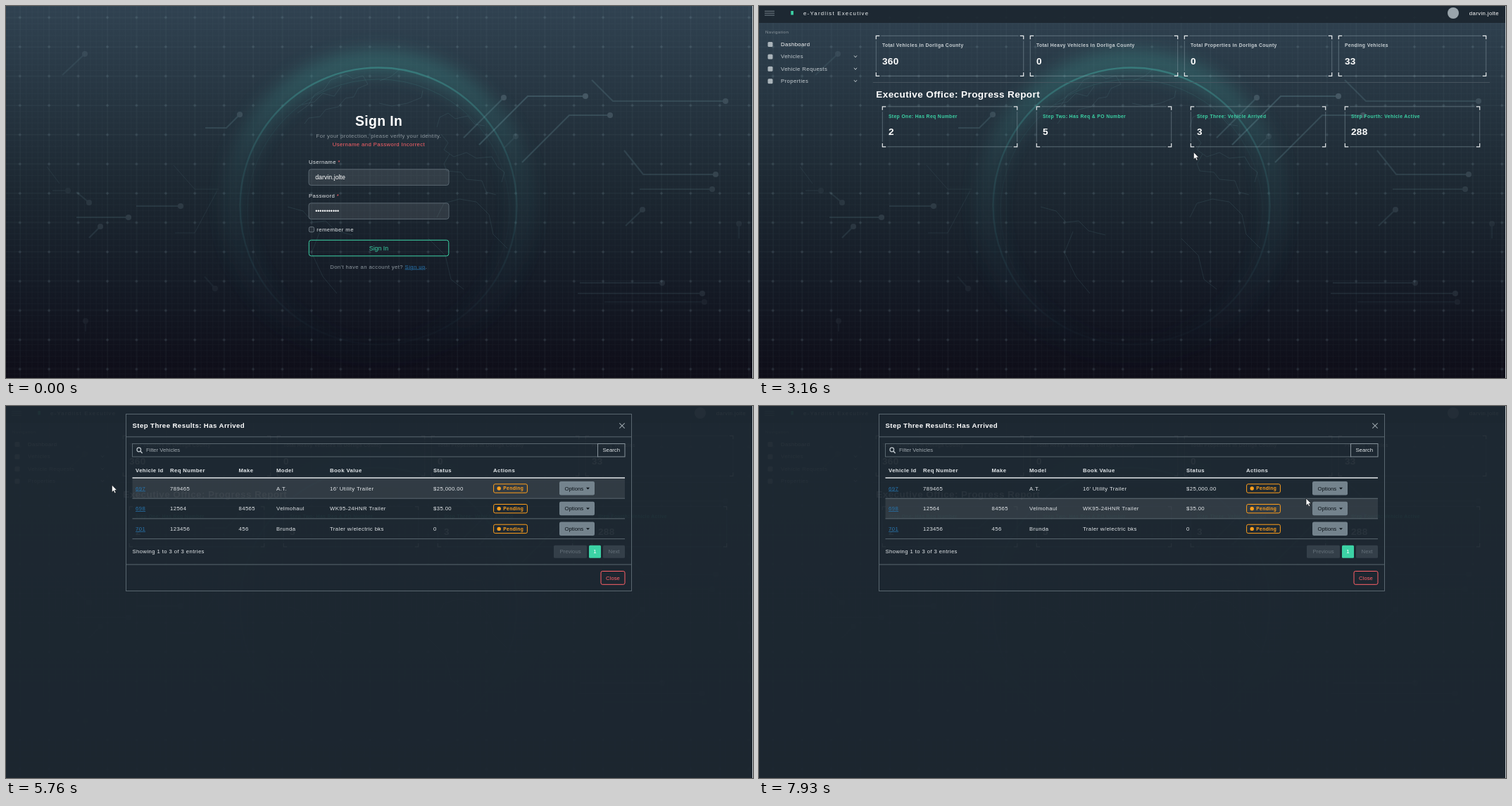
An HTML page for the animation above (8 s loop, 1061 by 528 pixels).

```html
<!DOCTYPE html>
<html lang="en">
<head>
<meta charset="utf-8">
<title>Vehicle progress dashboard</title>
<style>
  html, body { margin: 0; width: 100%; height: 100%; overflow: hidden; background: #141a24; }
  svg { display: block; width: 100vw; height: 100vh; }
  text { font-family: "Liberation Sans", Arial, sans-serif; white-space: pre; }
</style>
</head>
<body>
<svg id="stage" viewBox="0 0 1061 528" xmlns="http://www.w3.org/2000/svg"></svg>
<script>
const LOOP = 8000;
const GREEN = '#3cd2a5', RED = '#ff6168', ORANGE = '#ff9f1c', LINE = '#59666f', LINK = '#2674ad';
const USER = 'darvin.jolte', COUNTY = 'Dorliga County', BRAND = 'e-Yardlist Executive';
const BODY = 7.74, SMALL = 6.77, INPUT = 8.84;

const $ = id => document.getElementById(id);
const clamp = v => Math.max(0, Math.min(1, v));
const ease = v => 1 - (1 - clamp(v)) ** 2;

// drawing helpers
const text = (x, y, s, { size = BODY, fill = '#e3e7ea', bold, gap = .4, anchor = 'start', more = '' } = {}) =>
  `<text x="${x}" y="${y}" font-size="${size}" fill="${fill}" letter-spacing="${gap}" text-anchor="${anchor}"` +
  `${bold ? ' font-weight="700"' : ''} ${more}>${s}</text>`;
const rect = (x, y, w, h, fill = 'none', stroke = 'none', r = 0, more = '') =>
  `<rect x="${x}" y="${y}" width="${w}" height="${h}" rx="${r}" fill="${fill}" stroke="${stroke}" ${more}/>`;
const path = (d, stroke, width = 1, more = '') =>
  `<path d="${d}" fill="none" stroke="${stroke}" stroke-width="${width}" ${more}/>`;
const hline = (x1, x2, y, stroke = LINE, width = 1) => path(`M${x1} ${y}H${x2}`, stroke, width);

const defs = `<defs>
  <linearGradient id="sky" x2="0" y2="1">
    <stop offset="0" stop-color="#304251"/><stop offset=".25" stop-color="#263541"/>
    <stop offset=".5" stop-color="#1c2731"/><stop offset=".75" stop-color="#141a25"/>
    <stop offset="1" stop-color="#0e0d18"/>
  </linearGradient>
  <linearGradient id="rim" gradientUnits="userSpaceOnUse" x1="0" y1="85" x2="0" y2="480">
    <stop offset="0" stop-color="#3f9c96" stop-opacity=".55"/>
    <stop offset=".35" stop-color="#3a8084" stop-opacity=".24"/>
    <stop offset="1" stop-color="#3a7080" stop-opacity=".03"/>
  </linearGradient>
  <linearGradient id="wave">
    <stop offset="0" stop-color="#70787e" stop-opacity="0"/>
    <stop offset=".5" stop-color="#70787e"/>
    <stop offset="1" stop-color="#70787e" stop-opacity="0"/>
  </linearGradient>
  <filter id="soft" x="-30%" y="-30%" width="160%" height="160%"><feGaussianBlur stdDeviation="12"/></filter>
  <pattern id="fine" width="8.28" height="8.28" x="20" y="16.5" patternUnits="userSpaceOnUse">
    <path d="M0 0H8.28M0 0V8.28" stroke="#8fb0c0" stroke-width=".8" opacity=".07"/>
  </pattern>
  <pattern id="coarse" width="41.42" height="41.6" x="-1" y="-4.5" patternUnits="userSpaceOnUse">
    <path d="M0 20.8H41.4M20.7 0V41.6" stroke="#8fb0c0" stroke-width=".7" opacity=".07"/>
    <path d="M18.7 20.8h4M20.7 18.8v4" stroke="#a5c4d0" stroke-width=".8" opacity=".22"/>
  </pattern>
</defs>`;

function backdrop() {
  // each trace ends in a node: opacity, then the path from node to tail
  const traces = [
    [.24, 'M823 128H741L672 197'], [.2, 'M858 155H800L733 222'], [.2, 'M707 130L650 187'],
    [.17, 'M1022 135H862L832 105'], [.09, 'M724 185L708 201'], [.16, 'M1008 239H905L878 205'],
    [.12, 'M1003 260H900'], [.12, 'M904 289L880 312'], [.07, 'M1041 309V330'],
    [.1, 'M932 393H815'], [.1, 'M989 408H812'], [.06, 'M992 420H850'],
    [.1, 'M112 68L80 98'], [.17, 'M332 154L313 173H283'], [.13, 'M248 284H185'],
    [.14, 'M174 300H100'], [.12, 'M134 313L118 329'], [.06, 'M88 262H66'],
    [.1, 'M118 279L100 264'], [.06, 'M113 447V462'], [.06, 'M297 401L282 384']
  ].map(([o, d]) => {
    const [x, y] = d.match(/\d+/g);
    return `<g opacity="${o}">${path(d, '#7fb0b8', 2.2)}<circle cx="${x}" cy="${y}" r="4" fill="#a9c4cf"/></g>`;
  }).join('');
  const coast = 'M414 152l16-12 8-14 14-8 9-13 22-8 10 6 14-4 7 12-14 6-6 12-12 2-10 12-18 4-8 10-16 2-6 8M420 140l18-4 12-12 16 4 10-14' +
    'M531 106l16-6 12-10M530 138l18 4 22-4 20-8 2-10M612 172l4-14 12-6 10 8 18-4 10 12 14 2M618 182l10 12-6 10 14 10 18-6 14 8 22-2 8 14 10 8-4 14' +
    'M630 210l-8 14 4 10 20 2 8 10 22 2 6 16 14 4M612 300l10-20 22-6 24 4 18 18 6 28 20 20M400 285l22 6 14 16 18-2 14 14 24 6M446 320l-12 30 16 34 20 24M600 330l24 24 8 34 18 14';
  return rect(0, 0, 1061, 528, 'url(#sky)') + rect(0, 0, 1061, 528, 'url(#fine)') + rect(0, 0, 1061, 528, 'url(#coarse)') +
    `<circle cx="529" cy="284" r="205" fill="none" stroke="url(#rim)" stroke-width="34" filter="url(#soft)" opacity=".6"/>` +
    `<circle cx="529" cy="284" r="196.5" fill="none" stroke="url(#rim)" stroke-width="2.4"/>` +
    `<circle cx="529" cy="290" r="186" fill="none" stroke="url(#rim)" stroke-width="1" opacity=".35"/>` +
    path(coast, '#6fa3a8', 1, 'opacity=".15"') + path('M302 260H268L238 226M300 262L268 322H240M58 228l18 24', '#7fb0b8', 1, 'opacity=".1"') + traces;
}

function login() {
  const star = '<tspan fill="#ff6168"> *</tspan>';
  const field = y => rect(430, y, 199, 22.6, '#ffffff18', '#596670', 3.3);
  return text(529.6, 169.5, 'Sign In', { size: 19.34, bold: 1, fill: '#fff', anchor: 'middle' }) +
    text(529.4, 187.3, 'For your protection, please verify your identity.', { fill: '#8b959d', anchor: 'middle' }) +
    text(529.4, 199, 'Username and Password Incorrect', { fill: RED, anchor: 'middle' }) +
    text(430, 223.6, 'Username' + star) + field(231.8) +
    text(439.2, 246, USER, { size: INPUT, gap: 0, fill: '#fff' }) +
    text(430, 271.6, 'Password' + star) + field(279.8) +
    text(439.2, 294, '•'.repeat(11), { size: INPUT, gap: 0, fill: '#fff' }) +
    rect(430.4, 313.6, 7.2, 7.2, '#ffffff10', '#69757e', 2) + text(441.3, 319.8, 'remember me') +
    rect(428.5, 330.5, 202, 26, 'none', '#3cd2a580', 4.5, 'id="ring" stroke-width="3"') +
    rect(430.3, 332.3, 198.5, 22.5, 'none', GREEN, 3.3, 'id="signBtn"') +
    text(529.5, 346.5, 'Sign In', { size: INPUT, gap: 0, fill: GREEN, anchor: 'middle', more: 'id="signTxt"' }) +
    text(529.2, 372.5, `Don't have an account yet? <tspan fill="${LINK}" text-decoration="underline">Sign up</tspan>.`,
      { fill: '#8b959d', anchor: 'middle' });
}

function card(x, y, w, title, value, fill) {
  const h = 57, r = x + w, b = y + h;
  return path(`M${x + 7} ${y}H${r - 7}M${x + 7} ${b}H${r - 7}M${x} ${y + 7}V${b - 7}M${r} ${y + 7}V${b - 7}`, '#8fa3ad', .8, 'opacity=".6"') +
    path(`M${x} ${y + 5}V${y}h5M${r - 5} ${y}H${r}v5M${r} ${b - 5}V${b}h-5M${x + 5} ${b}H${x}v-5`, '#e8ecee', 1.2) +
    text(x + 8.6, y + 15.8, title, { size: SMALL, bold: 1, fill }) +
    text(x + 8.6, y + 40.3, value, { size: 13.54, bold: 1, fill: '#fff' });
}

// open: 0 collapsed sidebar, 1 expanded
function dashboard(open, loaded) {
  const x0 = 16.8 + 149.5 * open, pitch = 258.7 - 39.7 * open, w = pitch - 9.6;
  const totals = [`Total Vehicles in ${COUNTY}`, `Total Heavy Vehicles in ${COUNTY}`, `Total Properties in ${COUNTY}`, 'Pending Vehicles'];
  const steps = ['Step One: Has Req Number', 'Step Two: Has Req &amp; PO Number', 'Step Three: Vehicle Arrived', 'Step Fourth: Vehicle Active'];
  const counts = loaded ? [360, 0, 0, 33, 2, 5, 3, 288] : Array(8).fill(0);
  const row = (names, y, inset, from, fill) => names.map((s, i) =>
    card(x0 + i * pitch + inset, y, w - 2 * inset, s, counts[from + i], fill)).join('');
  const menu = ['Dashboard', 'Vehicles', 'Vehicle Requests', 'Properties'].map((s, i) => {
    const y = 57 + i * 17.4;
    return rect(12.5, y - 6, 7, 7, '#aab4ba', 'none', 1.5) + text(31, y, s, { fill: i ? '#c3cbd0' : '#fff' }) +
      (i ? path(`M135 ${y - 4}l2 2.5l2-2.5`, '#c3cbd0') : '');
  }).join('');
  return rect(0, 0, 1061, 24, '#1b252e', 'none', 0, 'opacity=".88"') +
    path('M8 7.3H22M8 10.2H22M8 13.1H22', '#7d8a92', .9) +
    rect(45.3, 7, 3.6, 5.6, GREEN) +
    text(63, 13, BRAND, { gap: 1.25, size: 7.8, fill: '#f2f5f6' }) +
    text(1051, 12.8, USER, { fill: '#fff', anchor: 'end' }) +
    (open ? '<circle cx="986" cy="10" r="8" fill="#9aa5ac"/>' : '') +
    `<g opacity="${open}" transform="translate(${150 * (open - 1)})">` +
    text(9, 39, 'Navigation', { size: 6.2, fill: '#8b959d' }) + menu + '</g>' +
    row(totals, 42.3, 0, 0, '#c9d0d4') + hline(x0 - 4.5, 1047 - 9 * open, 108.5, '#4d5a64', .8) +
    text(x0, 130, 'Executive Office: Progress Report', { size: 13.54, bold: 1, fill: '#fff' }) +
    row(steps, 142.8, 9, 4, GREEN);
}

function frame(bottom, footer) {
  return rect(170.5, 11.5, 718, bottom - 11.5, 'none', LINE) + hline(170.5, 888.5, 43.8) + hline(170.5, 888.5, footer) +
    text(179.5, 31, 'Step Three Results: Has Arrived', { size: 9.67, bold: 1, fill: '#fff' }) +
    path('M871.3 24.3l7.4 7.4m0-7.4l-7.4 7.4', '#9aa4aa', 1.1) +
    rect(845, footer + 9.5, 34, 18.8, 'none', RED, 2.2) +
    text(862, footer + 21.7, 'Close', { fill: RED, gap: 0, anchor: 'middle' });
}

const HEADS = ['Vehicle Id', 'Req Number', 'Make', 'Model', 'Book Value', 'Status', 'Actions'];
const heads = (xs, y) => HEADS.map((s, i) => text(xs[i], y, s, { bold: 1 })).join('');

function skeleton() {
  const xs = [179.5, ...[0, 1, 2, 3, 4, 5].map(i => 262.5 + i * 102.8)];
  let out = frame(208, 170.3) + heads(xs.map(x => x + 4.5), 61) + hline(179.5, 879, 69.6, '#e3e7ea', 1.4);
  for (let r = 0; r < 3; r++) {
    const y = 85 + r * 30.4;
    out += hline(179.5, 879, y + 15.4);
    xs.forEach((x, i) => {
      const w = i ? 82.2 : 66.4;
      out += rect(x, y - 4, w, 8, '#e6e7e8', 'none', 4) +
        `<svg x="${x}" y="${y - 6.5}" width="${w}" height="13">${rect(0, 0, w, 13, 'url(#wave)', 'none', 0, `class="wave" data-w="${w}"`)}</svg>`;
    });
  }
  return out;
}

const ROW_TOP = 102.5, ROW_H = 28.7;
function table() {
  const xs = [184, 233, 330.5, 384, 460, 607, 692];
  const data = [
    ['697', '789465', '', 'A.T.', "16' Utility Trailer", '$25,000.00'],
    ['698', '12564', '84565', 'Velmohaul', 'WK95-24HNR Trailer', '$35.00'],
    ['701', '123456', '456', 'Brunda', 'Traler w/electric bks', '0']
  ];
  const rows = data.map((cells, r) => {
    const y = ROW_TOP + r * ROW_H, m = y + 14.3;
    return rect(179.5, y, 699.5, ROW_H, '#ffffff', 'none', 0, 'class="row" fill-opacity=".085"') +
      cells.map((s, i) => text(xs[i], m + 2.7, s, i ? {} : { fill: LINK, more: 'text-decoration="underline"' })).join('') +
      rect(692.6, m - 6, 47.8, 12.4, 'none', ORANGE, 2.2) + `<circle cx="700.2" cy="${m + .2}" r="2.7" fill="${ORANGE}"/>` +
      text(706.3, m + 2.6, 'Pending', { size: 6.63, bold: 1, fill: ORANGE }) +
      rect(786, m - 9.7, 50, 19.4, '#74838d', 'none', 2.2, 'class="opt"') +
      text(793.5, m + 2.7, 'Options', { gap: 0, fill: '#0d141a' }) +
      `<path d="M824 ${m - 1}h5l-2.5 2.6z" fill="#0d141a"/>` + hline(179.5, 879, y + ROW_H);
  }).join('');
  const page = (x, w, s, fill, color) => rect(x, 197.8, w, 18, fill, 'none', 1.5) +
    text(x + w / 2, 209.4, s, { gap: 0, fill: color, anchor: 'middle' });
  return frame(262.5, 225) + rect(179.5, 53.5, 661, 18.5, 'none', LINE) + rect(840.5, 53.5, 38.5, 18.5, 'none', '#86929a') +
    '<circle cx="188.8" cy="62" r="2.8" fill="none" stroke="#c3cbd0" stroke-width="1.2"/>' + path('M190.8 64l2.8 2.9', '#c3cbd0', 1.4) +
    text(199, 65.3, 'Filter Vehicles', { gap: 0, fill: '#a0a9af' }) +
    text(859.7, 65.3, 'Search', { gap: 0, anchor: 'middle' }) +
    heads(xs, 94) + rows + hline(179.5, 879, 102, '#e3e7ea', 1.4) +
    text(179.5, 209.4, 'Showing 1 to 3 of 3 entries') +
    page(778, 47, 'Previous', '#343f49', '#65717a') + page(828, 17, '1', GREEN, '#fff') + page(848, 31, 'Next', '#343f49', '#65717a');
}

const pointer = `<g id="cursor">
  <path id="arrow" d="M0 0V10.4L2.4 8.2L4 11.8L5.8 11L4.2 7.5H7.3Z" fill="#fff" stroke="#10161c" stroke-width=".7"/>
  <path id="hand" d="M-.9 1q.9-1 1.8 0V5l5 1.2q1 .4.8 1.6L6 11.6Q5.4 13 4 13H1Q-.2 13-1 11.8L-3.8 8q0-1.4 1.4-1L-.9 8.2Z" fill="#fff" stroke="#10161c" stroke-width=".6"/>
</g>`;

$('stage').innerHTML = defs + backdrop() + `<g id="login">${login()}</g><g id="dash"></g>` +
  rect(0, 0, 1061, 528, '#1d2731', 'none', 0, 'id="veil"') +
  `<g id="modal"><g id="skeleton">${skeleton()}</g><g id="table">${table()}</g></g>` +
  rect(1060, 0, 1, 528, '#c4c9cc') + pointer;

const waves = document.querySelectorAll('.wave');
const rowEls = document.querySelectorAll('.row');
const optEls = document.querySelectorAll('.opt');
const show = (id, on) => $(id).setAttribute('visibility', on ? 'visible' : 'hidden');

// time, x, y of the pointer tip
const TRACK = [
  [130, 924, 486], [300, 800, 440], [520, 620, 370], [700, 540, 348], [760, 532, 342],
  [2700, 532, 342], [2820, 500, 376], [2960, 480, 330], [3110, 570, 230], [3250, 700, 168],
  [3390, 856, 168], [3510, 765, 172], [3570, 770, 172], [3830, 902, 176], [4240, 898, 214],
  [5030, 898, 214], [5090, 864, 183], [5300, 690, 165], [5600, 360, 140], [5760, 150, 112],
  [5890, 200, 118], [5960, 230, 110], [6060, 308, 101], [6160, 385, 101], [6400, 590, 106],
  [6730, 805, 112], [6870, 830, 116], [7010, 830, 116], [7330, 224, 124], [7500, 175, 128],
  [7780, 600, 132], [7930, 777, 131]
];
function tip(t) {
  const i = TRACK.findIndex(k => k[0] > t);
  if (i < 1) return i ? TRACK[TRACK.length - 1].slice(1) : TRACK[0].slice(1);
  const [a, ax, ay] = TRACK[i - 1], [b, bx, by] = TRACK[i], p = (t - a) / (b - a);
  return [ax + (bx - ax) * p, ay + (by - ay) * p];
}

let dashKey = '';
function update(t) {
  const [x, y] = tip(t);
  $('cursor').setAttribute('transform', `translate(${x} ${y})`);
  show('cursor', t >= 130);
  const onBtn = t < 1870 && x > 430 && x < 629 && y > 332 && y < 355;
  const hand = onBtn || (t >= 1870 && t < 2740);
  $('hand').style.display = hand ? '' : 'none';
  $('arrow').style.display = hand ? 'none' : '';

  $('login').style.display = t < 1870 ? '' : 'none';
  const hover = onBtn && t >= 130;
  $('signBtn').setAttribute('fill', hover ? GREEN : 'none');
  $('signTxt').setAttribute('fill', hover ? '#10181f' : GREEN);
  $('ring').setAttribute('opacity', t < 1740 ? clamp((t - 1300) / 150) : 0);

  const open = t < 2070 ? 0 : t < 2130 ? .6 : 1, key = t < 2010 ? '' : open + ':' + (t >= 2540);
  if (key !== dashKey) {
    $('dash').innerHTML = key && dashboard(open, t >= 2540);
    dashKey = key;
  }

  $('veil').setAttribute('opacity', .95 * clamp((t - 3570) / 150));
  const drop = ease((t - 3570) / 240);
  $('modal').setAttribute('opacity', drop);
  $('modal').setAttribute('transform', `translate(0 ${-28 * (1 - drop)})`);
  $('skeleton').style.display = t >= 3570 && t < 4560 ? '' : 'none';
  $('table').style.display = t >= 4560 ? '' : 'none';
  const sweep = clamp((t - 3727) / 513) * 2 - 1;
  waves.forEach(w => w.setAttribute('x', sweep * w.dataset.w));

  // hover styling trails the pointer slightly
  const [hx, hy] = tip(t - 70);
  const row = hx > 179.5 && hx < 879 ? Math.floor((hy - ROW_TOP) / ROW_H) : -1;
  rowEls.forEach((el, i) => el.setAttribute('visibility', i === row ? 'inherit' : 'hidden'));
  optEls.forEach((el, i) => {
    const over = i === row && hx > 786 && hx < 836 && Math.abs(hy - ROW_TOP - i * ROW_H - 14.3) < 9.7;
    el.setAttribute('fill', over ? '#8b99a2' : '#74838d');
  });
}

const start = performance.now();
function tick() {
  update((performance.now() - start) % LOOP);
  requestAnimationFrame(tick);
}
tick();
</script>
</body>
</html>
```
